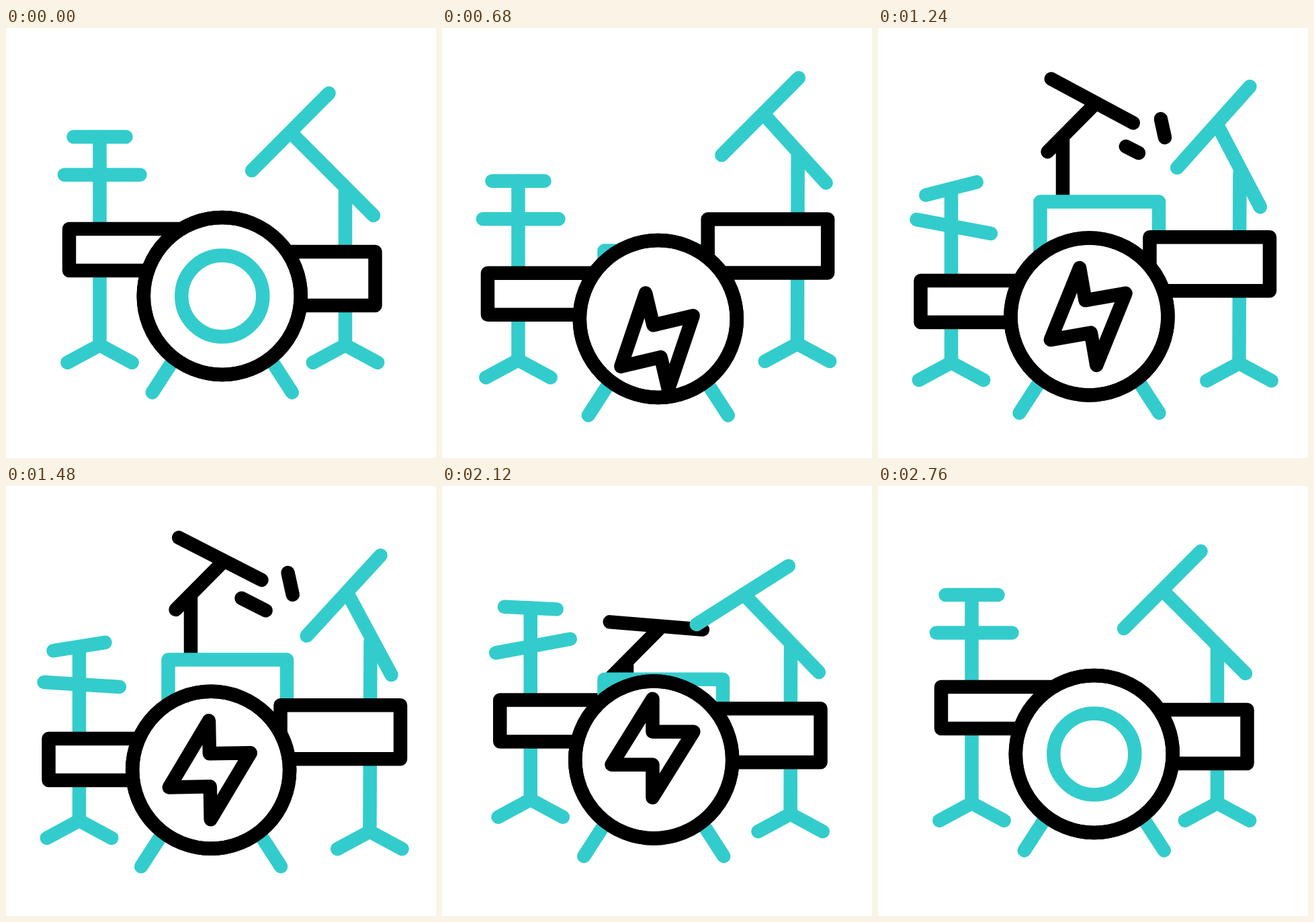
Animation, 640 px wide and 640 px high, one loop 2.8 s. Source, as an HTML page with a canvas:

```html
<!DOCTYPE html>
<html lang="en">
<head>
<meta charset="utf-8">
<title>Drum kit</title>
<style>
  html, body { margin: 0; width: 100%; height: 100%; overflow: hidden; background: #fff; }
  canvas { display: block; width: 100vw; height: 100vh; }
</style>
</head>
<body>
<canvas id="stage" width="640" height="640"></canvas>
<script>
const ctx = document.getElementById('stage').getContext('2d');
const LOOP = 2800, STEP = 40;
const TEAL = '#33cccc', BLACK = '#000';
let now = 0;

// cubic-bezier(.667, 0, .06, 1), solved by bisection
function ease(x) {
  if (x <= 0) return 0;
  if (x >= 1) return 1;
  let lo = 0, hi = 1;
  for (let i = 0; i < 24; i++) {
    const s = (lo + hi) / 2, r = 1 - s;
    if (2 * s * r * r + 0.18 * s * s * r + s * s * s < x) lo = s; else hi = s;
  }
  return lo * lo * (3 - 2 * lo);
}

// Keys are [time, value]; each segment is eased
function track(...keys) {
  let value = keys[0][1];
  for (let i = 1; i < keys.length; i++) {
    const [t0, v0] = keys[i - 1], [t1, v1] = keys[i];
    if (now >= t0) value = v0 + (v1 - v0) * ease((now - t0) / (t1 - t0));
  }
  return value;
}

function paint(color, fill) {
  if (fill) { ctx.fillStyle = fill; ctx.fill(); }
  ctx.strokeStyle = color;
  ctx.stroke();
}

function line(color, ...points) {
  ctx.beginPath();
  points.forEach(([x, y]) => ctx.lineTo(x, y));
  paint(color);
}

function box(color, x, y, w, h) {
  ctx.beginPath();
  ctx.rect(x, y, w, h);
  paint(color, '#fff');
}

function disc(color, x, y, r, fill) {
  ctx.beginPath();
  ctx.arc(x, y, r, 0, 2 * Math.PI);
  paint(color, fill);
}

function placed(x, y, degrees, draw) {
  ctx.save();
  ctx.translate(x, y);
  ctx.rotate(degrees * Math.PI / 180);
  draw();
  ctx.restore();
}

function bar(color, x, y, half, degrees) {
  placed(x, y, degrees, () => line(color, [-half, 0], [half, 0]));
}

function stand(topX, topY, footX, footY) {
  line(TEAL, [topX, topY], [footX, footY]);
  line(TEAL, [footX - 48.2, footY + 26], [footX, footY], [footX + 48.2, footY + 26]);
}

function leftStand() {
  const shift = track([130, 0], [1130, 1], [1760, 1], [2520, 0]);
  const squash = track([130, 0], [1130, 1], [1760, 1], [2660, 0]);
  const swing = (a, b) => track([720, 0], [1280, a], [1840, b], [1880, b], [2600, 0]);
  const x = 139.5 - 30.5 * shift, y = 77 * shift;
  stand(x, 162 + y, x, 472 + y - 51 * squash);
  bar(TEAL, x, 162 + y, 39, swing(-14.3, 3.4));
  bar(TEAL, x + 3.7, 218.5 + y, 56.3, swing(10.7, -13.5));
  box(BLACK, x - 45.5, 299 + y, 190, 62);
}

function spark(from, to, grown) {
  const end = track([1080, 0], [grown, 1]), start = track([1400, 0], [1840, 0.97]);
  if (now <= 1080 || now >= 1840 || end <= start) return;
  const at = k => from.map((v, i) => v + (to[i] - v) * k);
  line(BLACK, at(start), at(end));
}

function centreTom() {
  const sunk = track([400, 1], [1270, 0], [1820, 0], [2645, 1]);
  const tilt = track([720, 0], [1280, 28.3], [1840, 24.2], [2390, 0]);
  const y = 306 * sunk, top = 258.5 + 90 * sunk;
  line(BLACK, [275, 162 + y], [275, Math.max(162 + y, top)]);
  line(BLACK, [252.5, 184 + y], [322, 114 + y]);
  bar(BLACK, 318.8, 108.4 + y, 69.3, tilt);
  box(TEAL, 241.5, top, 176.5, 110);
  spark([427, 163], [419.5, 129], 1390);
  spark([388, 186], [350.5, 167], 1480);
}

function rightStand() {
  const move = (a, b) => track([120, 0], [895, a], [1700, b], [1760, b], [2600, 0]);
  const x = move(25.7, 38), y = move(-50.5, -5), slide = move(26.7, 26.7);
  const armTilt = track([880, 0], [1280, 14.5], [2240, 0]);
  const cymbal = track([880, -45.1], [1280, -48.2], [2240, -32.3], [2740, -45.1]);
  stand(505 + x, 238 + y, 505 + 0.97 * x, 472 + move(-2, 44));
  placed(505 + x, 238 + y, armTilt, () => {
    line(TEAL, [-81.7 + 1.18 * slide, -83 + 0.82 * slide], [42, 41]);
    bar(TEAL, -81.7 + slide, -83.4 + slide, 81.2, cymbal - armTilt);
  });
  box(BLACK, 371 + x, 333 + y, 178.5, 80);
}

function bassDrum() {
  const move = (a, b, c) => track([120, a], [920, b], [1760, c], [2600, a]);
  const x = move(321.8, 321.8, 304), y = move(399, 434.7, 422);
  for (const side of [-1, 1]) line(TEAL, [x + side * 70, y + 91], [x + side * 104, y + 143.5]);
  disc(BLACK, x, y, 117, '#fff');

  // The emblems scroll upwards inside the drum head
  ctx.save();
  ctx.clip();
  const ring = now < 1500 ? track([120, 0], [1050, -250]) : track([1920, 250], [2760, 0]);
  const bolt = track([120, 325], [1050, 0], [1920, 0], [2760, -240]);
  const tilt = track([440, 0], [920, -16.8], [1760, 0]);
  disc(TEAL, x, y + ring, 60.5);
  placed(x - 1.8, y + bolt, tilt, () => {
    ctx.beginPath();
    for (const s of [1, -1]) {
      ctx.lineTo(0, -73.5 * s);
      ctx.lineTo(-61 * s, 24.5 * s);
      ctx.lineTo(0, 24.5 * s);
    }
    ctx.closePath();
    paint(BLACK);
  });
  ctx.restore();
  disc(BLACK, x, y, 117);
}

function frame(time) {
  now = Math.floor(time % LOOP / STEP) * STEP;
  ctx.fillStyle = '#fff';
  ctx.fillRect(0, 0, 640, 640);
  ctx.lineWidth = 20.5;
  ctx.lineCap = ctx.lineJoin = 'round';
  leftStand();
  centreTom();
  rightStand();
  bassDrum();
  requestAnimationFrame(frame);
}
requestAnimationFrame(frame);
</script>
</body>
</html>
```
